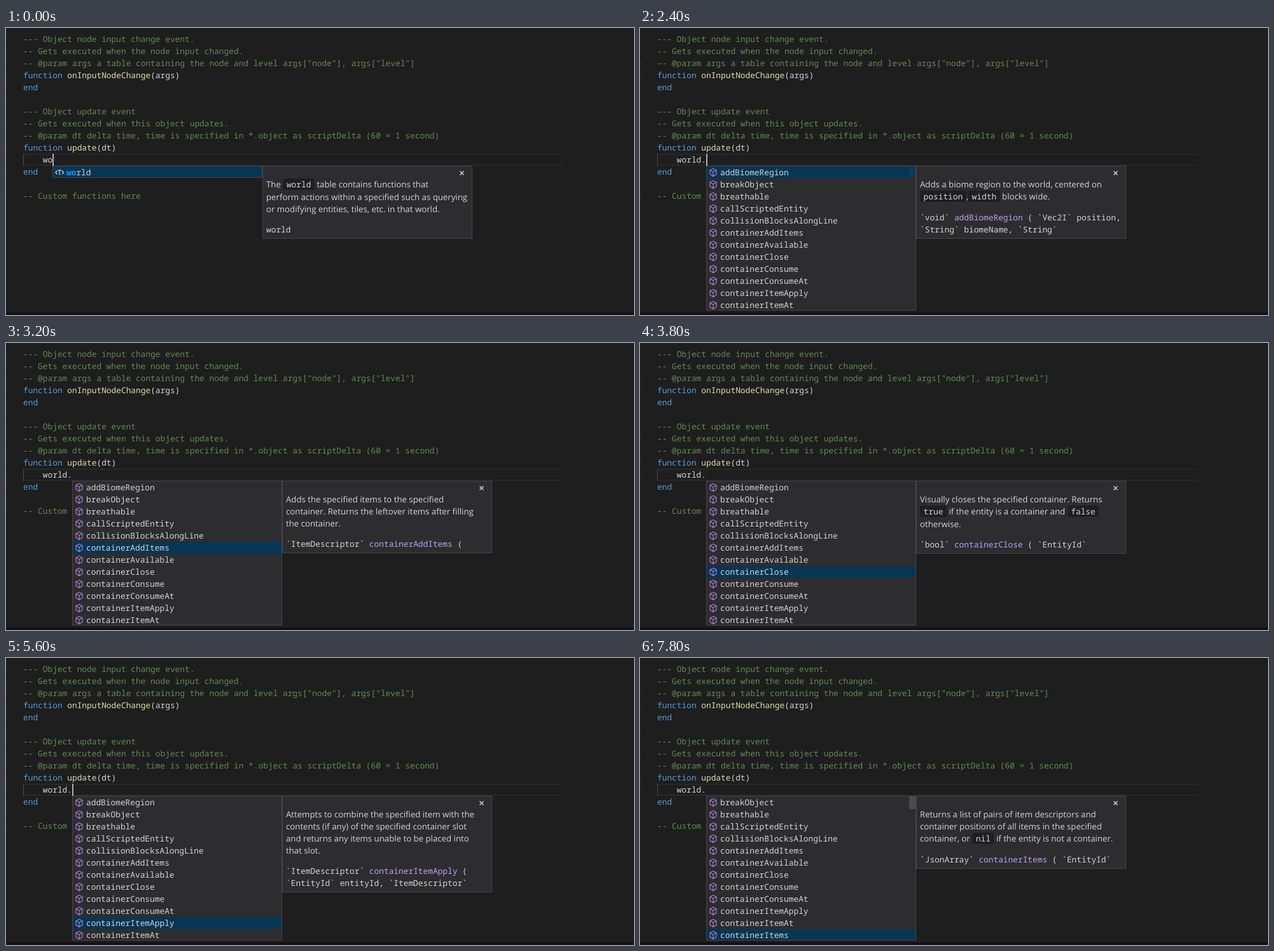
These frames come from a looping animation (987 by 452 pixels, 8 s). An HTML page:

```html
<!DOCTYPE html>
<html lang="en">
<head>
<meta charset="utf-8">
<title>Code completion</title>
<style>
html, body { margin: 0; width: 100%; height: 100%; overflow: hidden; background: #1e1e1e; }
#stage {
  position: relative; width: 987px; height: 452px; overflow: hidden; background: #1e1e1e;
  color: #d4d4d4; font: 12.83px/19px "Noto Sans Mono", monospace; white-space: pre;
  text-rendering: geometricPrecision;
}
#stage div, #stage svg { position: absolute; box-sizing: border-box; }
.c { color: #608b4e; }
.k { color: #569cd6; }
.f { color: #dcdcaa; }
#current { left: 27px; top: 198px; width: 849px; height: 19px; border: solid #282828; border-width: 2px 0; }
#guide { left: 27px; top: 198px; width: 1px; height: 19px; background: #4a4a4a; }
#caret { top: 198px; width: 2px; height: 19px; background: #aeafad; }
#strip { left: 0; top: 448px; width: 987px; height: 4px; background: #180f14; }
.tick { left: 0; width: 1px; height: 3px; background: #3a3a3a; }
#list, #panel { top: 217px; width: 330px; overflow: hidden; background: #2d2d30; border: 1px solid #454545; }
#list .row { left: 0; width: 328px; height: 19px; padding-left: 21px; }
#list .on { background: #073655; }
#list b { color: #0097fb; }
#list svg { left: 3px; top: 2px; }
.thumb { width: 10px; background: rgba(121, 121, 121, .4); }
#panel { max-height: 228px; padding: 19px 0 4px 5px; }
#stage #panel .line { position: static; height: 19px; }
#panel .doc { font-family: "Open Sans", sans-serif; font-size: 13.23px; }
#stage #panel .tall { height: 20px; }
#stage #panel .gap { position: static; height: 13px; }
#panel code { font: 12.83px/19px "Noto Sans Mono", monospace; padding: 0 5.6px; border-radius: 3px; background: rgba(10, 10, 10, .4); }
#panel i { font-style: normal; color: #b9a3ee; }
#panel svg { right: 11px; top: 6px; }
</style>
</head>
<body>
<div id="stage"></div>
<script>
const LOOP = 8000, STEP = 200, LINE = 19, CHAR = 12.83 * 0.6;

const source = [
  '<span class="c">--- Object node input change event.</span>',
  '<span class="c">-- Gets executed when the node input changed.</span>',
  '<span class="c">-- @param args a table containing the node and level args["node"], args["level"]</span>',
  '<span class="k">function</span> <span class="f">onInputNodeChange</span>(args)',
  '<span class="k">end</span>',
  '',
  '<span class="c">--- Object update event</span>',
  '<span class="c">-- Gets executed when this object updates.</span>',
  '<span class="c">-- @param dt delta time, time is specified in *.object as scriptDelta (60 = 1 second)</span>',
  '<span class="k">function</span> <span class="f">update</span>(dt)',
  '    <span id="typed"></span>',
  '<span class="k">end</span>',
  '',
  '<span class="c">-- Custom functions here</span>'
];

// Each entry: name, description lines, signature lines (@ marks the name).
const world = ['world', [
  'The `world` table contains functions that',
  'perform actions within a specified such as querying',
  'or modifying entities, tiles, etc. in that world.'], ['world']];

const entries = [
  ['addBiomeRegion', [
    'Adds a biome region to the world, centered on',
    '`position`,`width` blocks wide.'],
    ['`void` @ ( `Vec2I` position,', '`String` biomeName, `String`']],
  ['breakObject', [
    'Breaks the object with the specified entity id.',
    'Returns `true` if the operation succeeds.'],
    ['`bool` @ ( `EntityId` entityId,', '`bool` smash )']],
  ['breathable', [
    'Returns `true` if the specified position is',
    'breathable and `false` otherwise.'],
    ['`bool` @ ( `Vec2F` position )']],
  ['callScriptedEntity', [
    'Attempts to call the specified function name in',
    'the context of the specified scripted entity with the',
    'specified arguments and returns the result. This',
    'method is synchronous and thus can only be used',
    'on local master entities, i.e. scripts run on the',
    'server may only call scripted entities that are also',
    'server-side master and scripts run on the client',
    'may only call scripted entities that are client-side',
    'master on that client. For more featureful entity',
    'messaging, use world.sendEntityMessage.'],
    ['`LuaValue` @ ( `EntityId`']],
  ['collisionBlocksAlongLine', [
    'Returns an ordered list of tile collision blocks',
    'along the line between the specified points.'],
    ['`List` @ ( `Vec2F`', 'startPoint, `Vec2F` endPoint,']],
  ['containerAddItems', [
    'Adds the specified items to the specified',
    'container. Returns the leftover items after filling',
    'the container.'],
    ['`ItemDescriptor` @ (']],
  ['containerAvailable', [
    'Returns the number of the specified item that are',
    'currently available to consume in the specified',
    'container.'],
    ['`unsigned` @ ( `EntityId`']],
  ['containerClose', [
    'Visually closes the specified container. Returns',
    '`true` if the entity is a container and `false`',
    'otherwise.'],
    ['`bool` @ ( `EntityId`']],
  ['containerConsume', [
    'Attempts to consume items from the specified',
    'container that match the specified item descriptor',
    'and returns `true` if successful, `false` if',
    'unsuccessful, or `nil` if the entity is not a',
    'container. Only succeeds if the full stack of the',
    'specified count can be consumed.'],
    ['`bool` @ ( `EntityId`', 'entityId, `ItemDescriptor` item )']],
  ['containerConsumeAt', [
    'Similar to world.containerConsume but only',
    'considers the specified slot within the container.'],
    ['`bool` @ ( `EntityId`', 'entityId, `unsigned` offset, `unsigned`']],
  ['containerItemApply', [
    'Attempts to combine the specified item with the',
    'contents (if any) of the specified container slot',
    'and returns any items unable to be placed into',
    'that slot.'],
    ['`ItemDescriptor` @ (', '`EntityId` entityId, `ItemDescriptor`']],
  ['containerItemAt', [
    'Returns an item descriptor of the item at the',
    'specified position in the specified container, or',
    '`nil` if the entity is not a container or the offset is',
    'out of range.'],
    ['`ItemDescriptor` @ (', '`EntityId` entityId, `unsigned` offset )']],
  ['containerItems', [
    'Returns a list of pairs of item descriptors and',
    'container positions of all items in the specified',
    'container, or `nil` if the entity is not a container.'],
    ['`JsonArray` @ ( `EntityId`']]
];

const svg = (w, h, color, d, weight) =>
  `<svg width="${w}" height="${h}" fill="none" stroke="${color}" stroke-width="${weight}"><path d="${d}"/></svg>`;
const cube = svg(15, 15, '#b180d7', 'M7 1.5L12 4V10.5L7 13.5L2 10.5V4ZM2 4L7 6.7L12 4M7 6.7V13.5', 1.1);
const typeIcon = svg(15, 15, '#c5c5c5', 'M3.5 4.5L1 7.5L3.5 10.5M11 4.5L13.5 7.5L11 10.5M4.5 4H10M7.25 4V11.5', 1.4);
const cross = svg(9, 9, '#c5c5c5', 'M1.5 1.5L7.5 7.5M7.5 1.5L1.5 7.5', 1.7);

const stage = document.getElementById('stage');
stage.innerHTML = '<div id="current"></div><div id="guide"></div>' +
  source.map((s, i) => `<div style="left:27px;top:${8 + LINE * i}px">${s}</div>` +
    `<div class="tick" style="top:${16 + LINE * i}px"></div>`).join('') +
  '<div id="strip"></div><div id="list"></div><div id="panel"></div><div id="caret"></div>';
const [typed, list, panel, caret] = ['typed', 'list', 'panel', 'caret'].map(id => document.getElementById(id));

// Latest value whose start time has been reached.
const at = (t, keys) => keys.reduce((v, [start, value]) => t >= start ? value : v, keys[0][1]);
const letters = [[0, 2], [200, 4], [400, 5], [1400, 6]];
const picks = [[0, 0], [2600, 2], [2800, 3], [3000, 4], [3200, 5], [3400, 6], [3800, 7],
  [4000, 8], [4800, 9], [5600, 10], [6200, 11], [7000, 12]];
const barFade = [[0, 0], [1400, 1], [2000, .75], [2200, .45], [2400, .15], [2600, 0], [7000, 1]];

const row = (icon, label, i, on) =>
  `<div class="row${on ? ' on' : ''}" style="top:${i * LINE}px">${icon}${label}</div>`;
const thumb = (x, h, alpha) =>
  `<div class="thumb" style="left:${x}px;top:0;height:${h}px;opacity:${alpha}"></div>`;

function panelHtml([name, doc, sign], bar) {
  const text = doc.map(s => `<div class="line doc${s.includes('`') ? ' tall' : ''}">` +
    s.replace(/`(.*?)`/g, '<code>$1</code>') + '</div>').join('');
  const call = sign.map(s => `<div class="line">${s.replace('@', `<i>${name}</i>`)}</div>`).join('');
  return cross + text + '<div class="gap"></div>' + call + bar;
}

function draw(t) {
  const n = at(t, letters), pick = at(t, picks), members = n > 5;
  const x = Math.round(27 + CHAR * (4 + n));
  typed.textContent = 'world.'.slice(0, n);
  caret.style.left = x + 'px';
  caret.style.visibility = t < 800 || (t % 1000 >= 400 && t % 1000 < 800) ? 'visible' : 'hidden';

  list.style.left = x + 'px';
  list.style.height = (members ? 12 : 1) * LINE + 'px';
  if (members) {
    const first = Math.max(0, pick - 11);
    list.innerHTML = entries.slice(first, first + 12)
      .map((e, i) => row(cube, e[0], i, i + first === pick)).join('') + thumb(318, 20, at(t, barFade));
  } else {
    list.innerHTML = row(typeIcon, `<b>${'world'.slice(0, n)}</b>${'world'.slice(n)}`, 0, true);
  }

  panel.style.left = x + 330 + 'px';
  panel.style.display = t >= 1400 && t < 1600 ? 'none' : 'block';
  panel.innerHTML = panelHtml(members ? entries[pick] : world, members && pick === 3 ? thumb(318, 193, .15) : '');
}

let last = -1;
function frame() {
  const t = Math.floor(performance.now() % LOOP / STEP) * STEP;
  if (t !== last) draw(last = t);
  requestAnimationFrame(frame);
}
frame();
</script>
</body>
</html>
```
